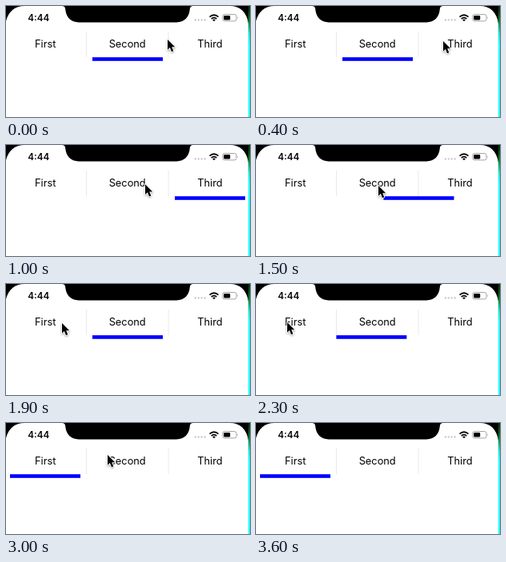
These frames come from a looping animation (305x139 px, 5300 ms). An HTML page:

```html
<!DOCTYPE html>
<html lang="en">
<head>
<meta charset="utf-8">
<title>Tab bar</title>
<style>
  html, body { margin: 0; width: 100%; height: 100%; overflow: hidden; background: #fff; }
  svg { display: block; width: 305px; height: 139px; }
  text { font-family: Inter, Roboto, sans-serif; text-anchor: middle; }
  .tab { font-size: 12.8px; }
  .time { font-size: 11.6px; font-weight: 600; }
  #cursor { filter: drop-shadow(0 1px 1px rgba(0, 0, 0, .35)); }
</style>
</head>
<body>
<svg viewBox="0 0 305 139">
  <defs>
    <linearGradient id="edge" x1="0" y1="0" x2="0" y2="1">
      <stop offset="0" stop-color="#052c08"/>
      <stop offset=".13" stop-color="#0a7a2a"/>
      <stop offset=".25" stop-color="#1ce8d0"/>
      <stop offset=".35" stop-color="#20ffff"/>
    </linearGradient>
  </defs>

  <!-- screen corners and notch -->
  <path d="M0 0H23C11 0 3 7 0 19Z"/>
  <path d="M280 0H305V22H303C301 8 293 0 280 0Z"/>
  <path d="M70 0Q74 0 74.200 4C75 14 81 20.400 91 20.400H213C223 20.400 229 14 229.800 4Q230 0 234 0Z"/>
  <rect x="302.800" width="2.200" height="139" fill="url(#edge)"/>

  <!-- status bar -->
  <text class="time" x="40.700" y="19">4:44</text>
  <path d="M236.800 17.500H249" fill="none" stroke="#c4c4c4" stroke-width="2.300"
        stroke-linecap="round" stroke-dasharray="0 3.900"/>
  <g fill="none" stroke="#000" stroke-width="1.700">
    <path d="M254.500 13.700Q260 8.800 265.500 13.700"/>
    <path d="M256.700 16Q260 13.200 263.300 16"/>
  </g>
  <path d="M258.200 17.300Q260 15.900 261.800 17.300L260 19.200Z"/>
  <rect x="270.800" y="10.500" width="17.200" height="8.400" rx="2.400" fill="#fff" stroke="#999" stroke-width=".9"/>
  <rect x="272.200" y="11.900" width="8" height="5.600" rx="1.200"/>
  <path d="M289.300 13.200Q290.700 14.700 289.300 16.200Z" fill="#999"/>

  <!-- tabs -->
  <path d="M100.500 32V64M203 32V64" stroke="#e9e9e9"/>
  <text class="tab" x="49.200" y="52">First</text>
  <text class="tab" x="151.700" y="52">Second</text>
  <text class="tab" x="254.900" y="52">Third</text>
  <rect id="bar" y="64.200" width="88" height="4.600" fill="#00f"/>

  <path id="cursor" d="M1 1V13.800L3.900 11.100L6 16.200L8.300 15.200L6.200 10.300H10.200Z"
        stroke="#fff" stroke-width="1.800" stroke-linejoin="round" paint-order="stroke"/>
</svg>
<script>
  const LOOP = 5300, STEP = 100, HIDE = 3600;
  const bar = document.getElementById('bar');
  const cursor = document.getElementById('cursor');

  // each move: start, end, target values
  const slide = (start, tab) => [start, start + 300, 5 + 103 * tab];
  const slides = [slide(550, 2), slide(1350, 1), slide(2250, 0)];
  const moves = [
    [0, 400, 233, 43],
    [700, 1150, 152, 50],
    [1600, 1900, 69, 48],
    [1900, 2100, 38, 47],
    [2400, 2600, 70, 48],
    [2600, 2900, 126, 39],
    [3300, 3500, 129, 48]
  ];

  function ease(p) {
    p = Math.min(1, Math.max(0, p));
    return p * p * (3 - 2 * p);
  }

  // value at time t after easing through every move in turn
  const follow = (home, list, t) => list.reduce((at, [start, end, ...to]) =>
    at.map((v, i) => v + (to[i] - v) * ease((t - start) / (end - start))), home);

  function draw(now) {
    // the picture advances ten times a second
    const t = Math.floor((now % LOOP) / STEP) * STEP;
    bar.setAttribute('x', follow([108], slides, t));
    cursor.setAttribute('transform', `translate(${follow([201, 41], moves, t)})`);
    cursor.style.display = t < HIDE ? '' : 'none';
  }

  const begin = performance.now();
  function tick() {
    draw(performance.now() - begin);
    requestAnimationFrame(tick);
  }
  tick();
</script>
</body>
</html>
```
